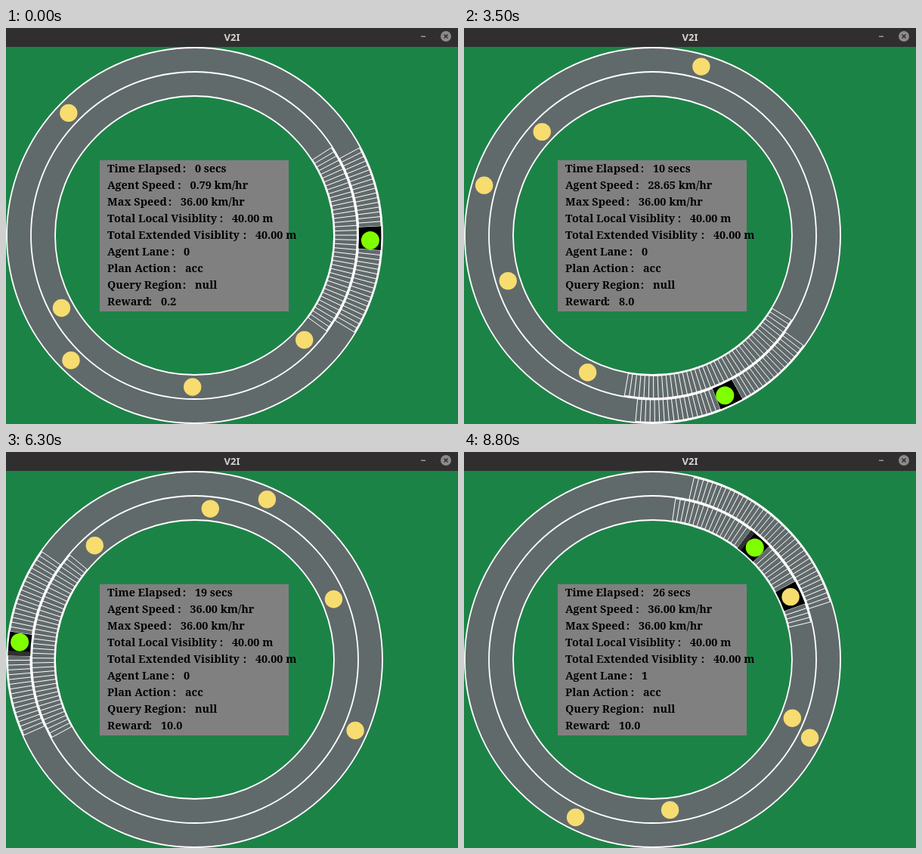
Recreate the animation shown at these times as an HTML page with a canvas. Size 598 by 524 pixels, loop 9000 ms.

```html
<!DOCTYPE html>
<html lang="en">
<head>
<meta charset="utf-8">
<title>V2I</title>
<style>
html, body { margin: 0; width: 100%; height: 100%; overflow: hidden; background: #1c8347; }
canvas { display: block; }
</style>
</head>
<body>
<canvas id="view" width="598" height="524"></canvas>
<script>
const ctx = document.getElementById('view').getContext('2d');
const LOOP = 9000, FRAME = 100, LAST = 88;
const CX = 249.5, CY = 274.5;
const EDGES = [248.5, 216.5, 184.5];
const LANES = [232.5, 200.5];
const SCALE = 6;                 // pixels per metre
const RAD = Math.PI / 180;
const ACC = 0.0073;              // metres per step squared
const TOP_STEP = 137;            // step at which the agent reaches full speed
const SWITCH_STEP = 208;         // agent moves to the inner lane
const HALF_VIEW = 20, HALF_CAR = 2.5;

// lane and starting angle (degrees, clockwise from the right)
const cars = [[0, 224.2], [1, 151.4], [0, 134.7], [1, 90.8], [1, 43.6]];
// step, metres driven, metres per step
const traffic = [
  [3, 0, 0.022], [36, 4.71, 0.262], [78, 22, 0.55], [109, 41.85, 0.705],
  [166, 86.3, 0.8], [220, 129.9, 0.817], [269, 170.3, 0.83]
];

const turn = (lane, metres) => metres * SCALE / LANES[lane];

// three simulation steps per picture, with an occasional extra one
const stepAt = n => 3 * (n + 1) + (n >= 30) + (n >= 80);

function agentRun(k) {
  const m = Math.min(k, TOP_STEP);
  return ACC * m * m / 2 + (k - m);
}

function trafficRun(k) {
  let i = 0;
  while (i < traffic.length - 2 && k > traffic[i + 1][0]) i++;
  const [k0, d0, v0] = traffic[i], [k1, d1, v1] = traffic[i + 1];
  const h = k1 - k0, u = (k - k0) / h, w = 1 - u;
  return d0 * (1 + 2 * u) * w * w + v0 * h * u * w * w
       + d1 * u * u * (3 - 2 * u) - v1 * h * u * u * w;
}

function agentState(k) {
  const lane = k >= SWITCH_STEP ? 1 : 0;
  const outer = agentRun(Math.min(k, SWITCH_STEP));
  const inner = Math.max(0, k - SWITCH_STEP);
  return { lane, angle: 1.55 * RAD + turn(0, outer) + turn(1, inner) };
}

const at = (r, a) => [CX + r * Math.cos(a), CY + r * Math.sin(a)];

function disc(x, y, r, color) {
  ctx.fillStyle = color;
  ctx.beginPath();
  ctx.arc(x, y, r, 0, 2 * Math.PI);
  ctx.fill();
}

function arc(r, from, to, width) {
  ctx.lineWidth = width;
  ctx.beginPath();
  ctx.arc(CX, CY, r, from, to);
  ctx.stroke();
}

function drawRoad() {
  disc(CX, CY, EDGES[0], '#616a6b');
  disc(CX, CY, EDGES[2], '#1c8347');
  ctx.strokeStyle = '#fff';
  EDGES.forEach(r => arc(r, 0, 2 * Math.PI, 1.8));
}

function drawGrid(lane, mid) {
  const out = EDGES[lane] - 1, inn = EDGES[lane + 1] + 0.5;
  ctx.strokeStyle = '#fff';
  ctx.lineWidth = 1;
  ctx.beginPath();
  for (let m = -HALF_VIEW; m <= HALF_VIEW; m++) {
    const a = mid + turn(lane, m);
    ctx.moveTo(...at(inn, a));
    ctx.lineTo(...at(out, a));
  }
  ctx.stroke();
  const half = turn(lane, HALF_VIEW);
  arc(out, mid - half, mid + half, 2);
  arc(inn, mid - half, mid + half, 2);
}

function fillCells(lane, mid, from, to, color) {
  const a = mid + turn(lane, Math.max(from, -HALF_VIEW));
  const b = mid + turn(lane, Math.min(to, HALF_VIEW));
  ctx.fillStyle = color;
  ctx.beginPath();
  ctx.arc(CX, CY, EDGES[lane] - 1.5, a, b);
  ctx.arc(CX, CY, EDGES[lane + 1] + 1, b, a, true);
  ctx.fill();
}

function occupy(lane, mid, metres) {
  const start = Math.floor(metres - HALF_CAR);
  fillCells(lane, mid, start, start + 2 * HALF_CAR, '#000');
}

function drawTitle() {
  ctx.fillStyle = '#302e2f';
  ctx.fillRect(0, 0, 598, 25);
  ctx.fillStyle = '#d6d4cf';
  ctx.font = 'bold 13px "Noto Sans", sans-serif';
  ctx.textAlign = 'center';
  ctx.fillText('V2I', 299, 17);
  ctx.fillStyle = '#999';
  ctx.fillRect(549, 10.5, 6, 1.5);
  disc(582, 11, 7, '#8c8b8b');
  ctx.strokeStyle = '#302e2f';
  ctx.lineWidth = 1.5;
  ctx.beginPath();
  ctx.moveTo(579.5, 8.5); ctx.lineTo(584.5, 13.5);
  ctx.moveTo(584.5, 8.5); ctx.lineTo(579.5, 13.5);
  ctx.stroke();
}

function drawPanel(k, lane) {
  const speed = Math.min(36, 36 * ACC * k);
  const rows = [
    ['Time Elapsed', 250, Math.floor((k - 0.5) / 10) + ' secs'],
    ['Agent Speed', 243.5, speed.toFixed(2) + ' km/hr'],
    ['Max Speed', 231, '36.00 km/hr'],
    ['Total Local Visiblity', 299, '40.00 m'],
    ['Total Extended Visiblity', 330, '40.00 m'],
    ['Agent Lane', 235, String(lane)],
    ['Plan Action', 237, 'acc'],
    ['Query Region', 250, 'null'],
    ['Reward', 205, (speed / 3.6).toFixed(1)]
  ];
  ctx.fillStyle = '#808080';
  ctx.fillRect(124, 175, 250, 200);
  ctx.fillStyle = '#000';
  ctx.font = 'bold 14.4px "Noto Serif", serif';
  rows.forEach(([label, x, value], i) => {
    const y = 191 + 22 * i;
    ctx.textAlign = 'left';
    ctx.fillText(label, 134, y);
    ctx.fillText(value, x, y);
    ctx.textAlign = 'center';
    ctx.fillText(':', x - 14, y);
  });
}

function draw(n) {
  const k = stepAt(n);
  const agent = agentState(k);
  const run = trafficRun(k);
  const mid = agent.angle;

  ctx.fillStyle = '#1c8347';
  ctx.fillRect(0, 0, 598, 524);
  drawRoad();
  drawGrid(0, mid);
  drawGrid(1, mid);

  occupy(agent.lane, mid, 0);
  if (n >= 40) fillCells(agent.lane, mid, -3, -2, '#303030');
  else if (n >= 20 && n < 30) fillCells(agent.lane, mid, 1, 2, '#303030');

  const spots = cars.map(([lane, deg]) => ({ lane, a: deg * RAD + turn(lane, run) }));
  for (const { lane, a } of spots) {
    const gap = Math.atan2(Math.sin(a - mid), Math.cos(a - mid));
    const metres = gap * LANES[lane] / SCALE;
    if (Math.abs(metres) < HALF_VIEW) occupy(lane, mid, metres);
  }
  for (const { lane, a } of spots) disc(...at(LANES[lane], a), 11.7, '#f7dc6f');
  disc(...at(LANES[agent.lane], mid), 12, '#80ff00');

  drawPanel(k, agent.lane);
  drawTitle();
}

const begin = performance.now();
function tick() {
  const t = (performance.now() - begin) % LOOP;
  draw(Math.min(LAST, Math.floor(t / FRAME)));
  requestAnimationFrame(tick);
}
tick();
</script>
</body>
</html>
```
